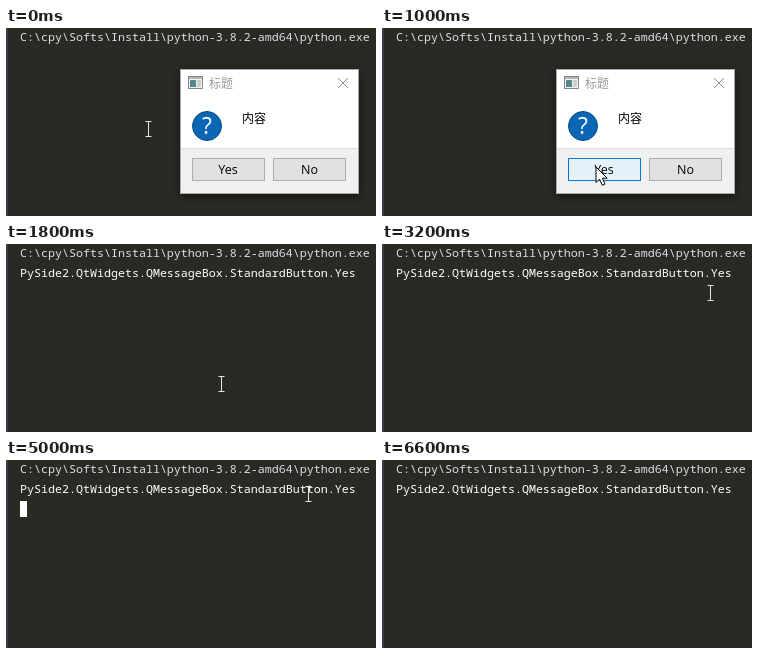
Animation, 370 px wide and 188 px high, one loop 7000 ms. Source, as an HTML page:

```html
<!DOCTYPE html>
<html lang="zh">
<head>
<meta charset="utf-8">
<title>Message box</title>
<style>
  html, body { margin: 0; width: 100%; height: 100%; overflow: hidden; background: #2a2a25; }
  svg { display: block; }
  .console { font: 500 11.667px "Noto Sans Mono", monospace; white-space: pre; }
  .ui { font: 12.5px "Open Sans", sans-serif; text-anchor: middle; }
  .cjk { font: 12px "Noto Sans CJK SC", "Noto Sans CJK", sans-serif; }
  #frame { filter: drop-shadow(0 2px 4px #0009); }
  .button { fill: #e1e1e1; stroke: #adadad; }
  .button.hover { fill: #e5f1fb; stroke: #0078d7; }
</style>
</head>
<body>
<svg width="370" height="188" viewBox="0 0 370 188">
  <rect width="370" height="188" fill="#2a2a25"/>
  <rect width="2" height="188" fill="#3b3b45"/>

  <rect id="selection" y="20" height="19" fill="#62635f"/>
  <g class="console">
    <text x="14" y="13" fill="#dedee8">C:\cpy\Softs\Install\python-3.8.2-amd64\python.exe</text>
    <text id="output" x="14" y="33" fill="#fff">PySide2.QtWidgets.QMessageBox.StandardButton.Yes</text>
  </g>
  <rect id="dragCaret" y="20" width="1.5" height="19" fill="#fff"/>
  <rect id="block" x="14" y="41" width="7" height="16" fill="#fff"/>

  <g id="dialog">
    <rect id="frame" x="174" y="41" width="179" height="125" fill="#fff"/>
    <rect x="174" y="120" width="179" height="46" fill="#f0f0f0"/>
    <path d="M174 120.5h179" stroke="#dfdfdf"/>
    <rect x="174.5" y="41.5" width="178" height="124" fill="none" stroke="#aaa"/>

    <rect x="182.5" y="48.5" width="14" height="12" fill="#f4f4f4" stroke="#858585"/>
    <path d="M183 50h13" stroke="#b5b5b5" stroke-width="2"/>
    <rect x="184" y="52" width="6" height="7" fill="#55868c"/>
    <rect x="191" y="52" width="4" height="7" fill="#c9cccc"/>
    <text id="title" class="cjk" x="203" y="59.5">标题</text>
    <path d="M332 50l10 10m0-10l-10 10" stroke="#8c8c8c"/>

    <circle cx="201" cy="98" r="14.5" fill="#0b66b5" stroke="#074b86"/>
    <text class="ui" x="201" y="106" style="font-size:23px" fill="#fff">?</text>
    <text class="cjk" x="236" y="95">内容</text>

    <rect id="yes" class="button" x="186.5" y="130.5" width="72" height="22"/>
    <rect class="button" x="267.5" y="130.5" width="72" height="22"/>
    <text class="ui" x="222" y="146">Yes</text>
    <text class="ui" x="303.5" y="146">No</text>
  </g>

  <g id="cursor">
    <path id="arrow" d="M0 0V15.5L3.6 12.2 6.3 18.3 9 17.1 6.4 11.2H11.2Z" fill="#fff" stroke="#000"/>
    <path id="beam" d="M-2.5-7.5H3.5M.5-7.5V7.5M-2.5 7.5H3.5" fill="none" stroke="#e6e6e2"/>
  </g>
</svg>
<script>
const LOOP = 7000, STEP = 200, CHAR = 7, TEXT_END = 350;
const $ = id => document.getElementById(id);
const show = (id, on) => $(id).style.display = on ? "" : "none";

// Pointer path: time, x, y
const path = [
  [0, 142, 101], [400, 172, 117], [1000, 214, 139], [1400, 214, 139],
  [1600, 215, 139], [1800, 215, 140], [2200, 215, 140],
  [2800, 285, 84], [3400, 350, 32], [3800, 350, 31], [4200, 341, 30],
  [4600, 330, 30], [4800, 326, 32], [5400, 255, 38], [5600, 245, 40],
  [5800, 245, 40], [6000, 178, 62], [6400, 61, 107]
];

function pointerAt(t) {
  const i = path.findIndex(p => p[0] >= t);
  if (i <= 0) return path[i < 0 ? path.length - 1 : 0].slice(1);
  const [t0, x0, y0] = path[i - 1], [t1, x1, y1] = path[i];
  const k = (t - t0) / (t1 - t0);
  return [x0 + (x1 - x0) * k, y0 + (y1 - y0) * k].map(Math.round);
}

function draw(now) {
  const t = Math.floor(now % LOOP / STEP) * STEP;
  const [x, y] = pointerAt(t);
  const closing = t >= 1600;

  show("dialog", t < 1800);
  $("dialog").setAttribute("opacity", closing ? 0.82 : 1);
  $("dialog").setAttribute("transform", closing ? "translate(263 102.5) scale(.984) translate(-263.5 -103)" : "");
  $("title").setAttribute("fill", closing ? "#111" : "#999");
  $("yes").classList.toggle("hover", x > 186 && y > 130);

  show("output", t >= 1800);
  const selected = t >= 4000 && t < 4800 ? Math.min(3, (t - 3800) / STEP) : 0;
  const left = TEXT_END - selected * CHAR;
  $("selection").setAttribute("x", left);
  $("selection").setAttribute("width", selected * CHAR);
  $("dragCaret").setAttribute("x", left - 0.5);
  show("dragCaret", selected > 0);
  show("block", t >= 5000 && t < 6200);

  const arrow = !closing && x > 174;
  $("cursor").setAttribute("transform", `translate(${x} ${y})`);
  show("cursor", t < 6600);
  show("arrow", arrow);
  show("beam", !arrow);
  $("beam").setAttribute("stroke", t === 1600 ? "#333" : "#e6e6e2");
}

const start = performance.now();
function tick() {
  draw(performance.now() - start);
  requestAnimationFrame(tick);
}
tick();
</script>
</body>
</html>
```
